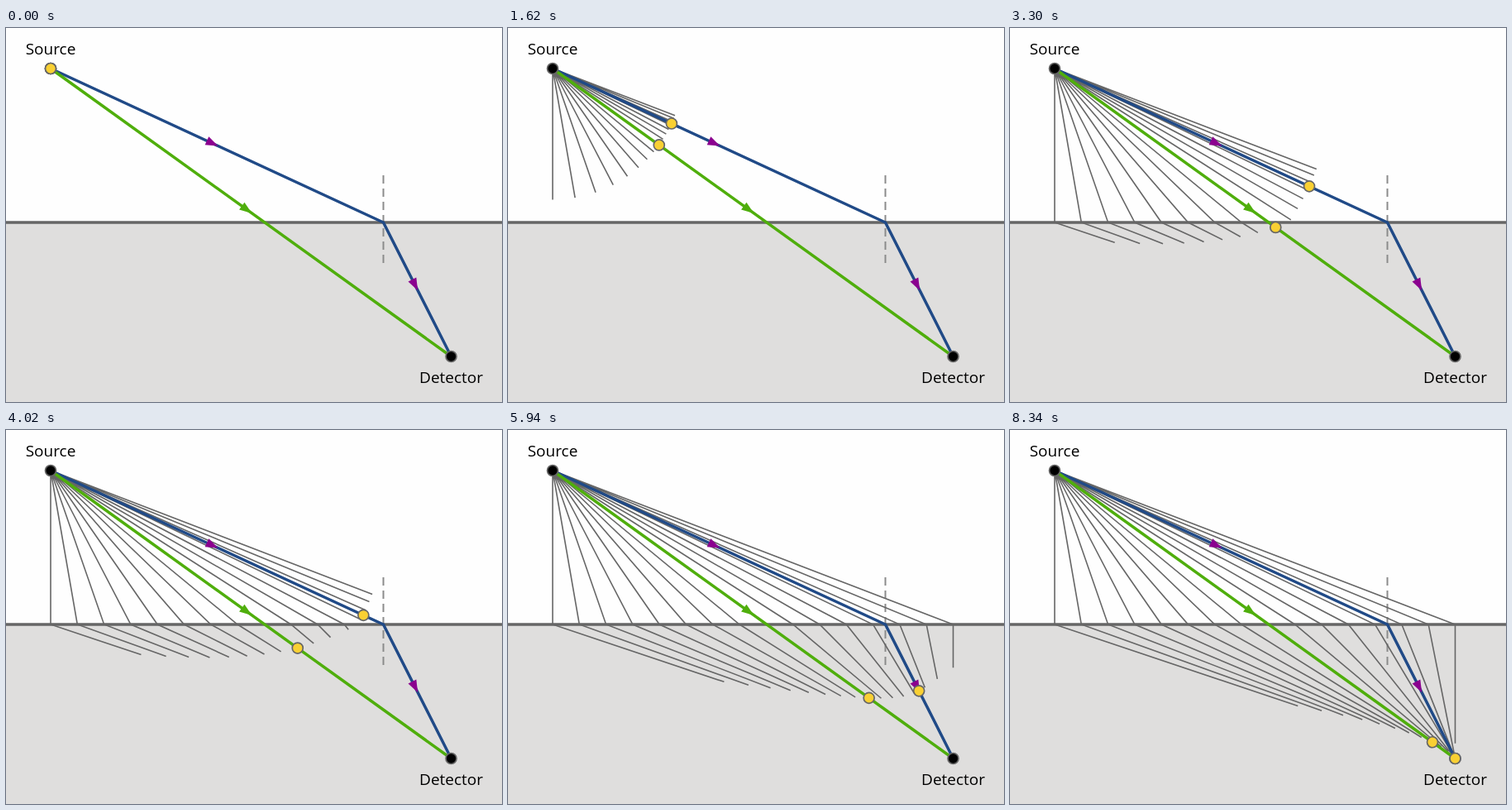
An HTML page that plays this animation: 600 by 452 pixels, repeating every 8.4 s.

```html
<!DOCTYPE html>
<html lang="en">
<head>
<meta charset="utf-8">
<title>Path of least time</title>
<style>
  html, body { margin: 0; height: 100%; overflow: hidden; background: #fefefe; }
  svg { display: block; width: 100%; height: 100%; }
  text { font: 19px "Open Sans", "Noto Sans", sans-serif; text-anchor: middle; }
  .path { fill: none; stroke-width: 3.5; stroke-linejoin: round; }
  .dot { stroke: #666; stroke-width: 1.7; }
</style>
</head>
<body>
<svg viewBox="0 0 600 452">
  <rect width="600" height="452" fill="#fefefe"/>
  <rect y="235" width="600" height="217" fill="#dfdedd"/>
  <path d="M456.5 178V285" stroke="#8b8b8b" stroke-width="2" stroke-dasharray="10 6"/>
  <path id="rays" fill="none" stroke="#666" stroke-width="1.6"/>
  <path d="M0 235H600" stroke="#666" stroke-width="3.5"/>
  <path class="path" stroke="#204a87" d="M54 49L456.5 235L538.5 397"/>
  <path class="path" stroke="#4fae0c" d="M54 49L538.5 397"/>
  <g id="arrows"></g>
  <circle class="dot" cx="54" cy="49" r="6.5"/>
  <circle class="dot" cx="538.5" cy="397" r="6.5"/>
  <g id="balls" fill="#f9d033"></g>
  <text x="54" y="32">Source</text>
  <text x="538.5" y="429">Detector</text>
</svg>
<script>
const LOOP = 8400, STEP = 60, START = 2.45, SPEED = 6.457, INDEX = 2, RAYS = 15;
const source = [54, 49], detector = [538.5, 397], surface = 235;
const fastX = 456.5, straightX = 313;
const $ = id => document.getElementById(id);
const dist = (a, b) => Math.hypot(b[0] - a[0], b[1] - a[1]);

// Point at distance d from a towards b, stopping at b
function along(a, b, d) {
  const f = Math.min(1, d / dist(a, b));
  return [a[0] + (b[0] - a[0]) * f, a[1] + (b[1] - a[1]) * f];
}

// Points of the route through (x, surface) after optical length s
function route(x, s) {
  const cross = [x, surface], first = dist(source, cross);
  return s <= first
    ? [source, along(source, cross, s)]
    : [source, cross, along(cross, detector, (s - first) / INDEX)];
}

function addArrow(a, b, color) {
  const angle = Math.atan2(b[1] - a[1], b[0] - a[0]) * 180 / Math.PI;
  const x = (a[0] + b[0]) / 2, y = (a[1] + b[1]) / 2;
  $('arrows').innerHTML +=
    `<path fill="${color}" transform="translate(${x} ${y}) rotate(${angle})" d="M1.5 0L-13.5 -5.5V5.5Z"/>`;
}

const bend = [fastX, surface];
addArrow(source, bend, '#8b008f');
addArrow(bend, detector, '#8b008f');
addArrow(source, detector, '#4fae0c');

const balls = [straightX, fastX].map(x => {
  $('balls').innerHTML += '<circle class="dot" r="6.5"/>';
  return x;
});

const fastest = dist(source, bend) + INDEX * dist(bend, detector);

function draw(now) {
  const tick = Math.floor(now % LOOP / STEP);
  const s = Math.min(fastest, Math.max(0, (tick - START) * SPEED));
  let d = '';
  for (let i = 0; i <= RAYS; i++) {
    const x = source[0] + (detector[0] - source[0]) * i / RAYS;
    d += 'M' + route(x, s).join('L');
  }
  $('rays').setAttribute('d', d);
  balls.forEach((x, i) => {
    const [cx, cy] = route(x, s).pop();
    const ball = $('balls').children[i];
    ball.setAttribute('cx', cx);
    ball.setAttribute('cy', cy);
  });
}

const begin = performance.now();
function frame() {
  draw(performance.now() - begin);
  requestAnimationFrame(frame);
}
frame();
</script>
</body>
</html>
```
